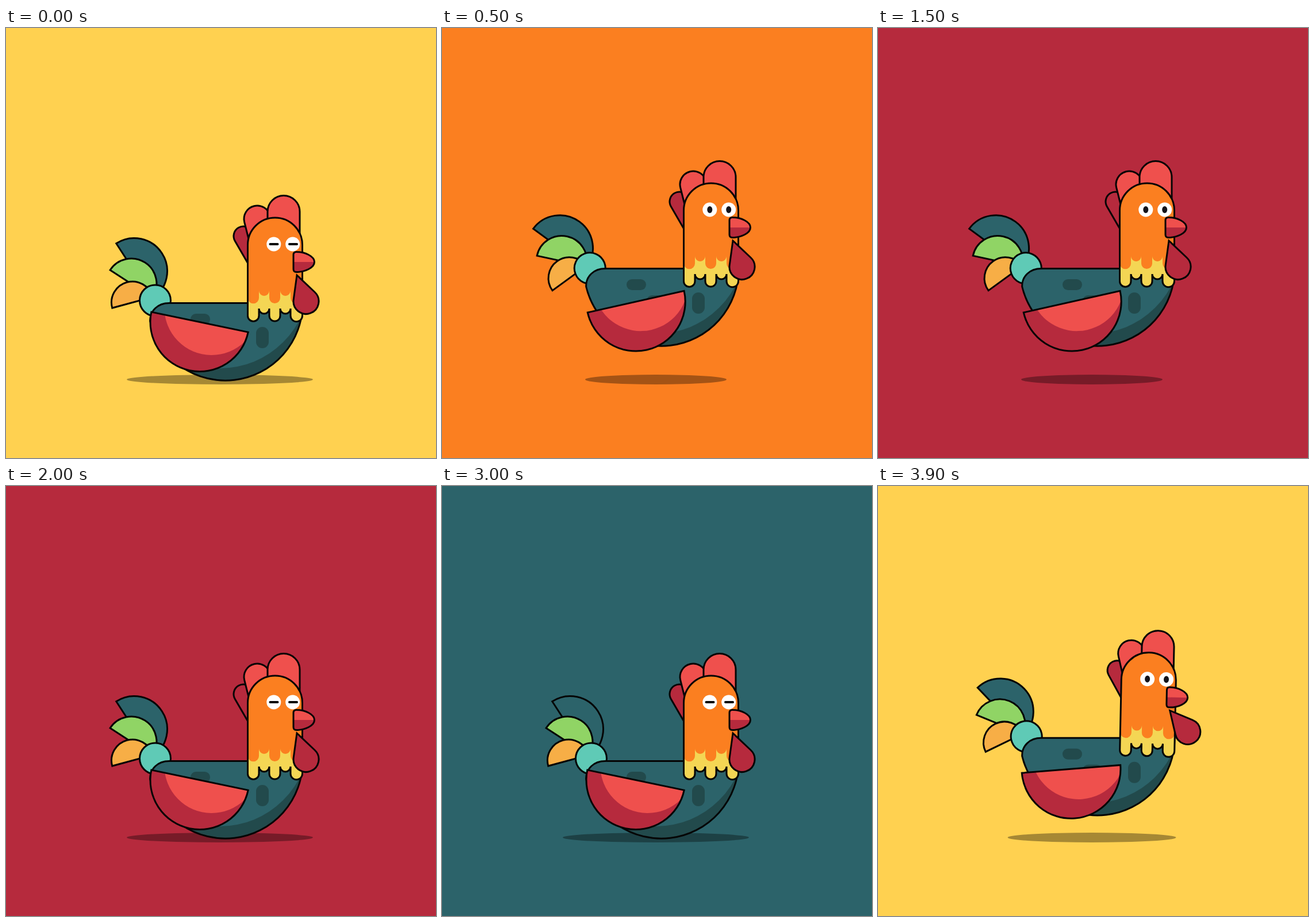
These frames come from a looping animation (748 by 748 pixels, 4 s). An HTML page:

```html
<!DOCTYPE html>
<html lang="en">
<head>
<meta charset="utf-8">
<title>Hopping rooster</title>
<style>
  html, body { margin: 0; width: 100%; height: 100%; overflow: hidden; background: #ffd150; }
  svg { display: block; width: 100vw; height: 100vh; }
  .ink { stroke: #050505; stroke-width: 3; stroke-miterlimit: 8; }
  .line { fill: none; }
  .teal { fill: #2c636a; }
  .deep { fill: #224a4c; }
  .red { fill: #b62a3d; }
  .coral { fill: #ef504d; }
  .orange { fill: #fb7f20; }
  .sand { fill: #f4d654; }
</style>
</head>
<body>
<svg viewBox="0 0 748 748" xmlns="http://www.w3.org/2000/svg">
  <defs>
    <path id="hull" d="M284 478.5H516A134.5 134.5 0 0 1 250.7 510C250 492 264 478.5 284 478.5Z"/>
    <path id="beak" d="M500 394.500Q500 389.500 505 389.500C520 389.500 536.500 397 536.500 407C536.500 417 520 424.500 505 424.500Q500 424.500 500 419.500Z"/>
    <path id="neck"/>
    <path id="fan"/>
    <clipPath id="inHull"><use href="#hull"/></clipPath>
    <clipPath id="inBeak"><use href="#beak"/></clipPath>
    <clipPath id="inFan"><use href="#fan"/></clipPath>
  </defs>

  <rect id="sky" width="748" height="748"/>
  <ellipse id="shadow" cx="372" cy="611.5" ry="8.500" opacity=".35"/>

  <g id="bird">
    <g id="tail" class="ink">
      <path id="plumeA" class="teal"/>
      <path id="plumeB" fill="#90d465"/>
      <path id="plumeC" fill="#f7ae46"/>
      <circle cx="259.5" cy="474" r="27" fill="#5fcab6"/>
    </g>

    <g clip-path="url(#inHull)">
      <use href="#hull" class="deep"/>
      <circle class="teal" cx="372" cy="436" r="156"/>
    </g>
    <g class="deep">
      <rect x="321" y="497" width="34" height="19" rx="9.5"/>
      <rect x="356" y="525" width="34" height="19" rx="9.5"/>
      <rect x="435" y="520" width="22" height="37" rx="11"/>
    </g>
    <use href="#hull" class="ink line"/>

    <g id="wing">
      <g transform="translate(-58 0)">
        <use href="#fan" class="red"/>
        <circle class="coral" cx="15.200" cy="-28.600" r="82.300" clip-path="url(#inFan)"/>
        <use href="#fan" class="ink line"/>
      </g>
    </g>

    <g id="head">
      <g class="ink">
        <path id="combA" class="red" transform="translate(413 362) rotate(-30)"/>
        <path id="combB" class="coral" transform="translate(437 332) rotate(-14)"/>
        <path id="combC" class="coral" transform="translate(483 319.5)"/>
      </g>
      <use href="#neck" class="sand"/>
      <path id="mane" class="orange"/>
      <use href="#neck" class="ink line"/>

      <g fill="#fff">
        <circle cx="465.800" cy="376" r="12.500"/>
        <circle cx="498.700" cy="376" r="12.500"/>
      </g>
      <g id="open" fill="#14131a">
        <ellipse cx="465.800" cy="376" rx="4.500" ry="6"/>
        <ellipse cx="498.700" cy="376" rx="4.500" ry="6"/>
      </g>
      <path id="shut" d="M459.500 376H472.500M493 376H506" stroke="#050505" stroke-width="4" stroke-linecap="round"/>

      <g id="wattle">
        <path class="red ink" d="M0 0L19.600 38.200A22 22 0 1 1 -19.600 38.200Z"/>
      </g>
      <g clip-path="url(#inBeak)">
        <use href="#beak" class="coral"/>
        <rect class="red" x="495" y="407" width="50" height="25"/>
      </g>
      <use href="#beak" class="ink line"/>
    </g>
  </g>
</svg>

<script>
const $ = id => document.getElementById(id);
const set = (id, name, value) => $(id).setAttribute(name, value);

const LOOP = 4000, HOP = 1000, STEP = 100;
const SKIES = ['#ffd150', '#fb7f20', '#b62a3d', '#2c636a'];

// Half disc whose flat side starts at angle `deg` and whose arc runs clockwise
function halfDisc(cx, cy, r, deg) {
  const a = deg * Math.PI / 180, dx = r * Math.cos(a), dy = r * Math.sin(a);
  return `M${cx + dx} ${cy + dy}A${r} ${r} 0 0 1 ${cx - dx} ${cy - dy}Z`;
}

// Upright lobe, round on top, running down by `len`
const lobe = (r, len) => `M${-r} ${len}V0A${r} ${r} 0 0 1 ${r} 0V${len}Z`;

// Round-topped neck with a fringe of long and short feathers
function neck(lift) {
  const low = 500.5 - lift, high = 488 - lift;
  const end = (y, w) => `V${y}a${w / 2} ${w / 2} 0 0 0 ${w} 0`;
  return 'M420.5 377.5' + end(low, 19.5) + end(high, 18) + end(low, 19)
    + end(high, 18) + end(low, 20.5) + 'V377.5A47.5 47.5 0 0 0 420.5 377.5Z';
}

// Smooth curve through points, without overshoot between them
function curve(...pts) {
  const slope = i => (pts[i + 1][1] - pts[i][1]) / (pts[i + 1][0] - pts[i][0]);
  const last = pts.length - 1;
  const tangents = pts.map((_, i) => {
    if (i === 0) return 0;
    if (i === last) return slope(i - 1);
    const a = slope(i - 1), b = slope(i);
    return a * b > 0 ? 2 * a * b / (a + b) : 0;
  });
  return x => {
    let i = 0;
    while (i < last - 1 && x > pts[i + 1][0]) i++;
    const [x0, y0] = pts[i], [x1, y1] = pts[i + 1];
    const w = x1 - x0, u = (x - x0) / w, v = 1 - u;
    return y0 * v * v * (1 + 2 * u) + y1 * u * u * (1 + 2 * v)
      + w * u * v * (tangents[i] * v - tangents[i + 1] * u);
  };
}

const rise = curve([0, 0], [400, 48], [500, 60], [640, 69.5], [800, 55], [900, 40.2], [1000, 0]);
const swing = curve([0, 0], [500, 20.8], [660, 28], [800, 22.3], [900, 10.7], [1000, 0]);
const shrink = curve([0, 0], [500, 39], [640, 44], [800, 33], [900, 15.5], [1000, 0]);
const sag = curve([0, 0], [500, 0], [900, 4.5], [1000, 0]);
const nod = curve([0, 0], [500, 0], [800, 1.6], [900, 1.2], [1000, 0]);
const fling = curve([0, 0], [500, 0], [800, 28], [900, 22], [1000, 0]);

function draw(time) {
  const t = Math.floor((time + 20) / STEP) * STEP % LOOP;
  const p = t % HOP, y = rise(p);
  const shut = p < 150;

  set('sky', 'fill', SKIES[Math.floor((t + HOP / 2) / HOP) % SKIES.length]);
  set('shadow', 'rx', 162 - shrink(p));
  set('bird', 'transform', `translate(0 ${-y})`);
  set('tail', 'transform', `rotate(${-swing(p)} 269 482)`);
  set('wing', 'transform', `translate(393.8 ${523.4 + sag(p)}) rotate(${11.8 - 0.407 * y})`);
  set('head', 'transform', `rotate(${nod(p)} 468 511)`);
  set('wattle', 'transform', `translate(506 430) rotate(${-19.4 - fling(p)})`);
  set('open', 'visibility', shut ? 'hidden' : 'visible');
  set('shut', 'visibility', shut ? 'visible' : 'hidden');
}

set('plumeA', 'd', halfDisc(223, 423, 57.5, -122.9));
set('plumeB', 'd', halfDisc(218, 445, 44, -147));
set('plumeC', 'd', halfDisc(220, 477.5, 36.5, 164.8));
set('fan', 'd', halfDisc(0, 0, 86, 0));
set('combA', 'd', lobe(17, 50));
set('combB', 'd', lobe(23, 40));
set('combC', 'd', lobe(28, 45));
set('neck', 'd', neck(0));
set('mane', 'd', neck(31));

function tick() {
  draw(performance.now());
  requestAnimationFrame(tick);
}
tick();
</script>
</body>
</html>
```
